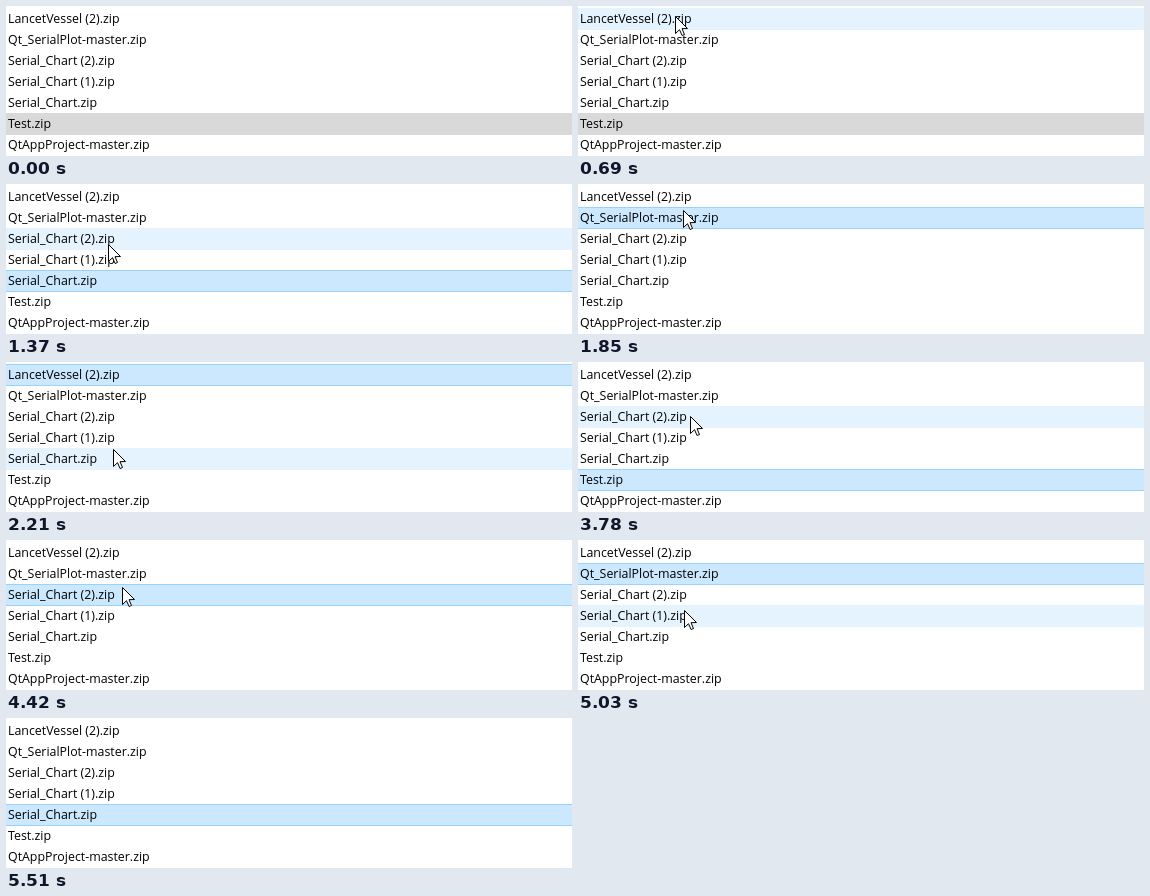
An HTML page with a canvas for the animation above (6.17 s loop, 566x150 px).

```html
<!DOCTYPE html>
<html lang="en">
<head>
<meta charset="utf-8">
<title>File list</title>
<style>
html, body { margin: 0; width: 566px; height: 150px; overflow: hidden; background: #fff; }
canvas { display: block; }
</style>
</head>
<body>
<canvas id="stage" width="566" height="150"></canvas>
<script>
const W = 566, H = 150, LOOP = 6170, STEP = 40, TOP = 2, PITCH = 21, ROW_H = 22;
const ctx = document.getElementById("stage").getContext("2d");

const files = [
  "LancetVessel (2).zip",
  "Qt_SerialPlot-master.zip",
  "Serial_Chart (2).zip",
  "Serial_Chart (1).zip",
  "Serial_Chart.zip",
  "Test.zip",
  "QtAppProject-master.zip"
];

// Each stroke starts where the last one ended, passes a turn and stops
const entry = [92, H];
const strokes = [
  { start: 450, end: 1010, turn: [97, 10], stop: [104, 94] },
  { start: 1130, end: 1730, turn: [102, 60], stop: [105, 42] },
  { start: 1770, end: 1970, turn: [105, 26], stop: [106, 14] },
  { start: 2130, end: 2730, turn: [107, 113], stop: [103, 113] },
  { start: 2890, end: 3250, turn: [93, 103], stop: [80, H] },
  { start: 3500, end: 4100, turn: [112, 54], stop: [114, 62] },
  { start: 4180, end: 4700, turn: [116, 47], stop: [112, 34] },
  { start: 4950, end: 5150, turn: [106, 70], stop: [104, 90] },
  { start: 5350, end: 5510, turn: [100, 120], stop: [96, H] }
];
const TURN_AT = 0.465;

const arrow = [[0, 0], [0, 17], [4, 13.2], [6.6, 19], [9, 18], [6.5, 12.2], [12, 12]];

const easeOut = k => 1 - (1 - k) ** 4;
const rowAt = y => Math.floor((y - TOP) / PITCH);
const glide = (a, b, k) => a.map((v, i) => Math.round(v + (b[i] - v) * easeOut(k)));

function pointerAt(t) {
  let from = entry;
  for (const { start, end, turn, stop } of strokes) {
    if (t < start) break;
    if (t < end) {
      const u = Math.floor((t - start) / STEP) * STEP / (end - start);
      return u < TURN_AT
        ? glide(from, turn, u / TURN_AT)
        : glide(turn, stop, (u - TURN_AT) / (1 - TURN_AT));
    }
    from = stop;
  }
  return from;
}

// Every stroke that stops on the list ends with a click
function selectedAt(t) {
  const done = strokes.filter(s => s.end <= t && s.stop[1] < H);
  return done.length ? rowAt(done.pop().stop[1]) : files.indexOf("Test.zip");
}

function fill(color, x, y, w, h) {
  ctx.fillStyle = color;
  ctx.fillRect(x, y, w, h);
}

function drawRow(row, color, edge = color) {
  const y = TOP + row * PITCH;
  fill(edge, 0, y, W, ROW_H);
  fill(color, 0, y + 1, W, ROW_H - 2);
}

function drawPointer([px, py]) {
  ctx.beginPath();
  for (const [x, y] of arrow) ctx.lineTo(px + x + 0.5, py + y + 0.5);
  ctx.closePath();
  ctx.fillStyle = "#fff";
  ctx.fill();
  ctx.strokeStyle = "#000";
  ctx.stroke();
}

function draw(t) {
  fill("#fff", 0, 0, W, H);
  const pointer = pointerAt(t);
  const selected = selectedAt(t);
  const hover = rowAt(pointer[1]);

  if (t < strokes[0].end) drawRow(selected, "#d9d9d9");
  else drawRow(selected, "#cce8ff", "#99d1ff");
  if (hover < files.length && hover !== selected) drawRow(hover, "#e5f3ff");

  ctx.font = '12.4px "Open Sans", "Noto Sans", sans-serif';
  ctx.fillStyle = "#000";
  files.forEach((name, i) => ctx.fillText(name, 2, 17 + i * PITCH));

  // Top edge of the tooltip opening below the pointer
  if (t >= 3090 && t < 3250) {
    fill("#bebebe", 86, 147, 155, 3);
    fill("#fff", 87, 148, 153, 2);
  }
  if (pointer[1] < H) drawPointer(pointer);
}

const begin = performance.now();
function tick() {
  draw((performance.now() - begin) % LOOP);
  requestAnimationFrame(tick);
}
tick();
</script>
</body>
</html>
```
